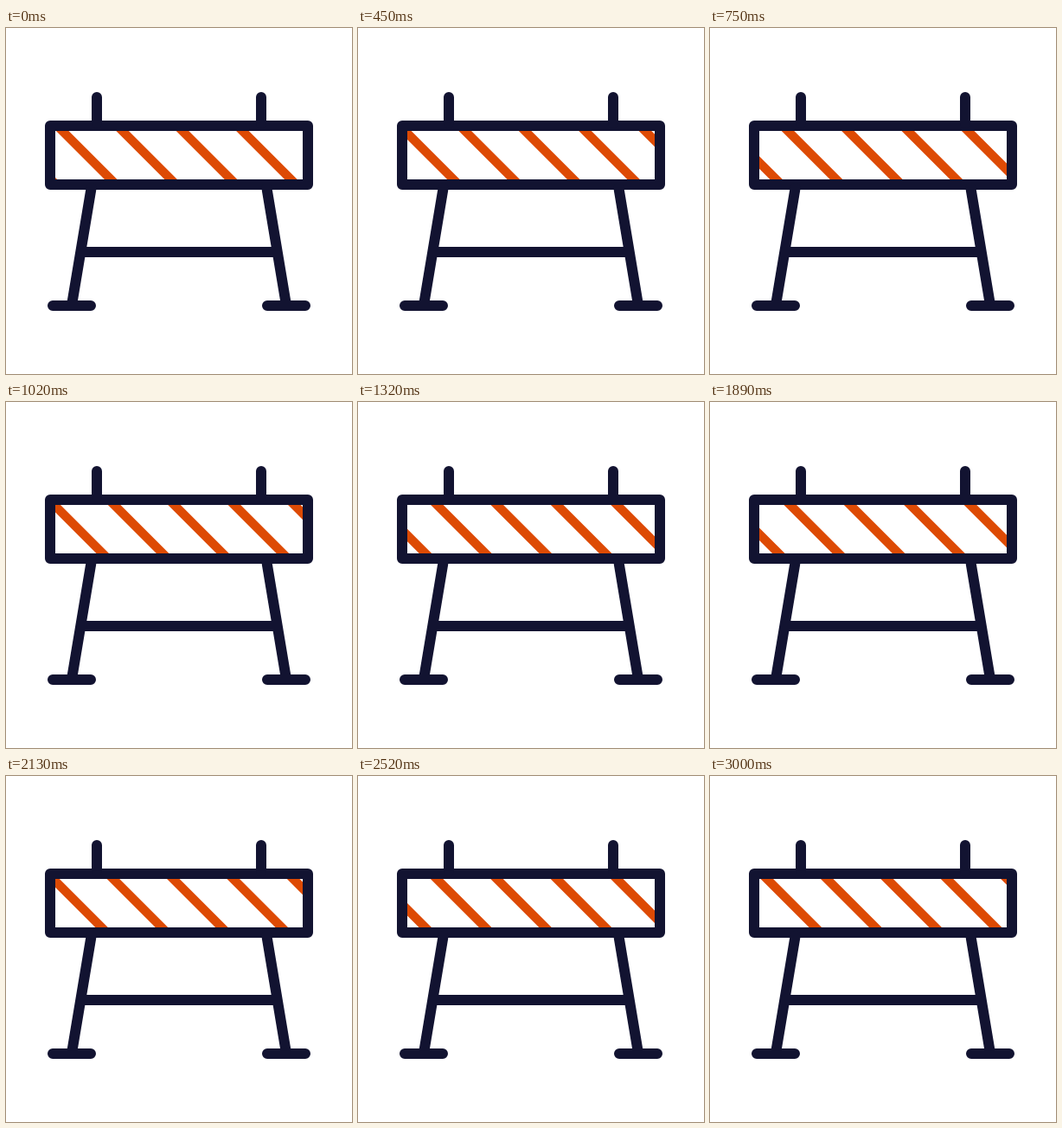
These frames come from a looping animation (400 px wide and 400 px high, 3.03 s). An HTML page:

```html
<!DOCTYPE html>
<html lang="en">
<head>
<meta charset="utf-8">
<title>Road barrier</title>
<style>
  html, body { margin: 0; width: 100%; height: 100%; overflow: hidden; background: #fff; }
  svg { display: block; width: 100%; height: 100%; }
</style>
</head>
<body>
<svg viewBox="0 0 400 400" fill="none">
  <clipPath id="board"><rect x="55" y="117" width="290" height="60"/></clipPath>
  <g clip-path="url(#board)">
    <path id="stripes" stroke="#dd4a04" stroke-width="10.3"/>
  </g>
  <g stroke="#121331" stroke-width="12" stroke-linecap="round" stroke-linejoin="round">
    <rect x="51" y="113" width="298" height="68"/>
    <path d="M105 80V110M295 80V110M98.6 185L76.4 318M301.4 185L323.6 318M90 259H310M54 321H98M302 321H346"/>
  </g>
</svg>
<script>
  const LOOP = 3030, STEP = 30;
  const CYCLE = 559.5, QUICK_CYCLES = 4; // the last, slower cycle fills the rest of the loop
  const TRAVEL = 72.8, GAP = 69.4;
  const stripes = document.getElementById('stripes');

  let d = '';
  for (let i = 0; i < 5; i++) d += `M${-25.2 + i * GAP} 98l100 100`;
  stripes.setAttribute('d', d);

  function shiftAt(t) {
    const slowStart = CYCLE * QUICK_CYCLES;
    const phase = t < slowStart
      ? (t % CYCLE) / CYCLE
      : (t - slowStart) / (LOOP - slowStart);
    return phase * TRAVEL;
  }

  const start = performance.now();
  function draw() {
    const t = (performance.now() - start) % LOOP;
    const shift = shiftAt(Math.floor(t / STEP) * STEP);
    stripes.setAttribute('transform', `translate(${shift} 0)`);
    requestAnimationFrame(draw);
  }
  draw();
</script>
</body>
</html>
```
